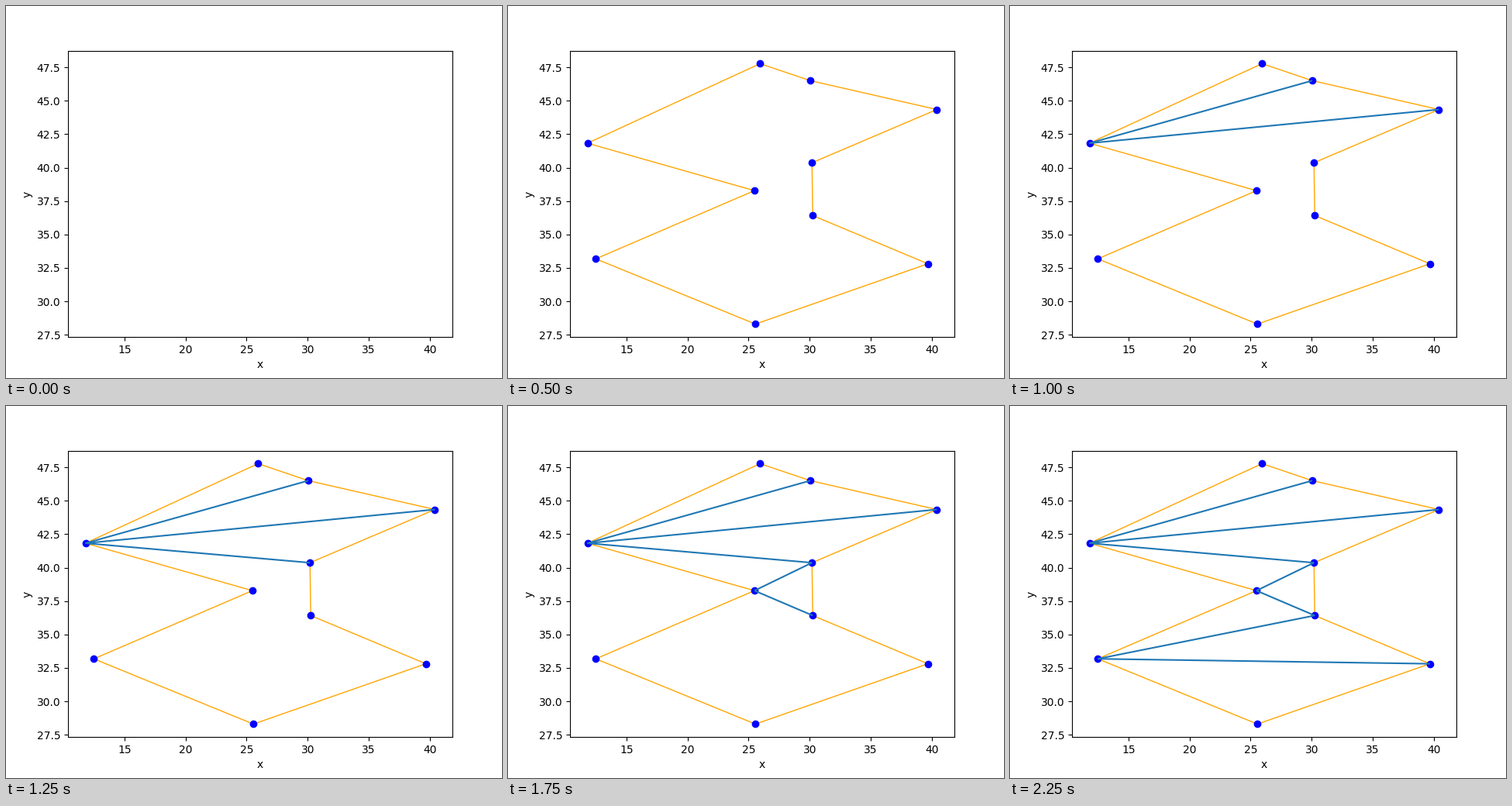
These frames come from a looping animation (640 px wide and 480 px high, 2.5 s). A matplotlib script:

```python
import matplotlib.pyplot as plt
from matplotlib.animation import FuncAnimation
from matplotlib.collections import LineCollection

# Y-monotone polygon: two chains of corners, each from top to bottom
RIGHT = [(25.94, 47.78), (30.05, 46.51), (40.42, 44.35), (30.19, 40.37),
         (30.25, 36.42), (39.68, 32.81), (25.56, 28.30)]
LEFT = [(11.81, 41.83), (25.48, 38.28), (12.49, 33.18)]
INTERVAL = 250


def is_convex(a, b, c):
    """Whether the chain a-b-c bulges out of the polygon at b."""
    cross = (b[0] - a[0]) * (c[1] - b[1]) - (b[1] - a[1]) * (c[0] - b[0])
    return cross > 0 if b in LEFT else cross < 0


def triangulate(corners):
    """Sweep down a monotone polygon and yield its diagonals."""
    first, second, *others, last = sorted(corners, key=lambda p: -p[1])
    stack = [first, second]
    for corner in others:
        top = stack[-1]
        if (corner in LEFT) != (top in LEFT):
            for seen in stack[1:]:
                yield seen, corner
            stack = [top]
        else:
            while len(stack) > 1 and is_convex(*stack[-2:], corner):
                stack.pop()
                yield stack[-1], corner
        stack.append(corner)
    for seen in stack[1:-1]:
        yield seen, last


plt.rcParams["font.family"] = "DejaVu Sans"
fig, ax = plt.subplots(figsize=(6.4, 4.8), dpi=100)
ax.set_xlabel("x")
ax.set_ylabel("y")

corners = RIGHT + LEFT[::-1]
edges = list(zip(corners, corners[1:] + corners[:1]))
outline = ax.add_collection(LineCollection(edges, colors="orange", linewidths=1))
dots, = ax.plot(*zip(*corners), "bo")
diagonals = [ax.add_collection(LineCollection([d], colors="tab:blue"))
             for d in triangulate(corners)]
parts = [outline, dots, *diagonals]


def update(frame):
    """Reveal one more part on every step after the empty axes."""
    for i, part in enumerate(parts):
        part.set_visible(i < frame)
    return parts


anim = FuncAnimation(fig, update, frames=len(parts) + 1, interval=INTERVAL,
                     repeat=True, repeat_delay=0)
plt.show()
```
